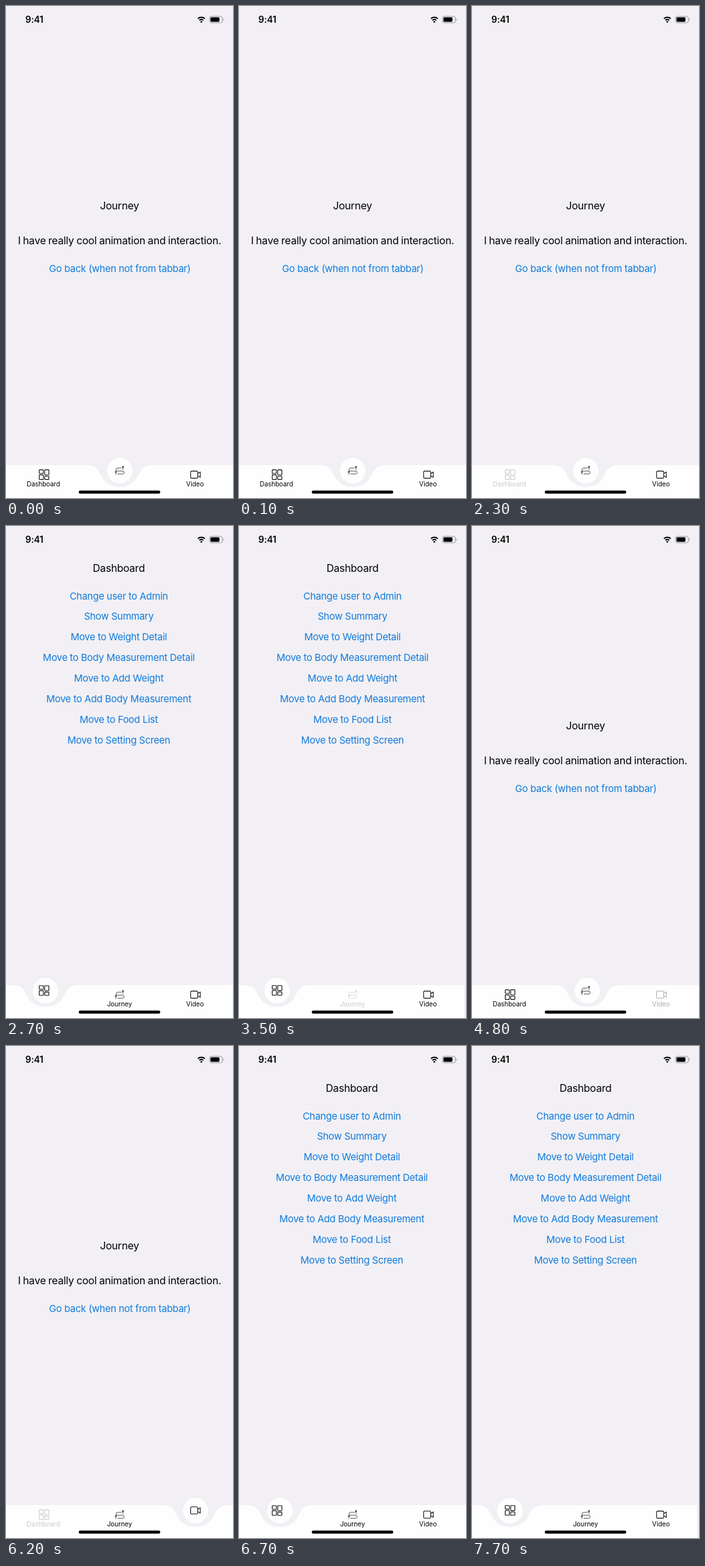
These frames come from a looping animation (352x762 px, 8 s). An HTML page:

```html
<!DOCTYPE html>
<html lang="en">
<head>
<meta charset="utf-8">
<title>Tab bar</title>
<style>
  html, body { margin: 0; width: 100%; height: 100%; overflow: hidden; background: #f2f0f4; }
  svg { display: block; width: 100vw; height: 100vh; }
  text { font: 15px Inter, sans-serif; letter-spacing: -.27px; text-anchor: middle; }
  .title { font-size: 16px; letter-spacing: -.2px; word-spacing: -.5px; }
  .link { fill: #117add; }
  .label { font-size: 10px; letter-spacing: 0; }
  .clock { font-size: 14px; font-weight: 600; letter-spacing: -.1px; }
  .icon { fill: none; stroke: #111; stroke-width: 1.1; stroke-linejoin: round; }
  .thin { stroke: #444; stroke-width: .9; }
</style>
</head>
<body>
<svg viewBox="0 0 352 762">
  <defs>
    <linearGradient id="shade">
      <stop offset="0" stop-opacity="0"/>
      <stop offset="1" stop-opacity=".04"/>
    </linearGradient>
  </defs>
  <rect width="352" height="762" fill="#f2f0f4"/>
  <g id="dashboard">
    <text class="title" x="176" y="71">Dashboard</text>
  </g>
  <rect id="dim" width="352" height="762"/>
  <g id="journey">
    <rect id="edge" x="-9" width="9" height="762" fill="url(#shade)"/>
    <rect width="352" height="762" fill="#f2f0f4"/>
    <text class="title" x="176" y="314.5">Journey</text>
    <text class="title" x="176" y="369">I have really cool animation and interaction.</text>
    <text class="link" x="176.5" y="412">Go back (when not from tabbar)</text>
  </g>

  <path id="bar" fill="#fefefe"/>
  <circle id="knob" cy="719.7" r="19.6" fill="#fefefe"/>
  <g id="tabs">
    <g>
      <g class="icon">
        <rect x="-7.5" y="-7.5" width="6.5" height="5.6" rx=".8"/>
        <rect x="1" y="-7.5" width="6.5" height="7.8" rx=".8"/>
        <rect x="-7.5" y=".2" width="6.5" height="7.3" rx=".8"/>
        <rect x="1" y="2.4" width="6.5" height="5.1" rx=".8"/>
      </g>
      <text class="label" x="58" y="743.5">Dashboard</text>
    </g>
    <g>
      <g class="icon thin">
        <path d="M-3.5 5.5H4.5a2.3 2.3 0 0 0 0-4.6H-3.5a2.3 2.3 0 0 1 0-4.6H3M-6 2V6.5M5-5.5V-1"/>
        <circle cx="-6" cy="2.2" r="1.1" fill="#444"/>
        <circle cx="5" cy="-5.5" r="1.1" fill="#444"/>
      </g>
      <text class="label" x="176" y="743.5">Journey</text>
    </g>
    <g>
      <g class="icon">
        <rect x="-7.5" y="-5.5" width="11" height="11" rx="1.5"/>
        <path d="M3.5-1.6L7.4-4.2V4.2L3.5 1.6"/>
      </g>
      <text class="label" x="293" y="743.5">Video</text>
    </g>
  </g>
  <rect x="112.8" y="750.4" width="126.4" height="4.9" rx="2.4"/>

  <text class="clock" x="44" y="26">9:41</text>
  <g fill="none" stroke="#000" stroke-width="2">
    <path d="M297.6 19.6a7.6 7.6 0 0 1 10.6 0M299.9 22.2a4.4 4.4 0 0 1 6 0"/>
    <path d="M302.9 26.2l-1.8-2a2.6 2.6 0 0 1 3.6 0z" fill="#000" stroke="none"/>
    <rect x="315.5" y="16" width="20" height="10" rx="2.8" stroke="#9b9a9d" stroke-width="1"/>
    <rect x="317" y="17.5" width="14" height="7" rx="1.4" fill="#000" stroke="none"/>
    <path d="M337.2 19.4v3.2" stroke="#9b9a9d" stroke-width="1"/>
  </g>
</svg>
<script>
const LOOP = 8000, WIDTH = 352;
const $ = id => document.getElementById(id);
const tabs = [...$('tabs').children];

// Each tap: finger down, release, tab left, tab entered
const taps = [
  { down: 2290, up: 2340, from: 1, to: 0 },
  { down: 3490, up: 3660, from: 0, to: 1 },
  { down: 4590, up: 4760, from: 1, to: 2 },
  { down: 6190, up: 6340, from: 2, to: 0 },
];

const links = ['Change user to Admin', 'Show Summary', 'Move to Weight Detail',
  'Move to Body Measurement Detail', 'Move to Add Weight', 'Move to Add Body Measurement',
  'Move to Food List', 'Move to Setting Screen'];
$('dashboard').innerHTML += links.map((text, i) =>
  `<text class="link" x="176" y="${113.5 + 31.9 * i}">${text}</text>`).join('');

const clamp = x => Math.max(0, Math.min(1, x));
const mix = (a, b, k) => a + (b - a) * k;
const easeInOut = x => x < .5 ? 2 * x * x : 1 - 2 * (1 - x) ** 2;
const tabX = i => 59 + 117.4 * i;

// Critically damped spring: stiffness 1000, mass 3
function spring(ms) {
  const s = Math.sqrt(1000 / 3) * Math.max(0, ms) / 1000;
  return 1 - Math.exp(-s) * (1 + s);
}

function barPath(x) {
  return `M0 711H${x - 53}C${x - 37} 711 ${x - 33} 718 ${x - 29} 727` +
    `C${x - 24} 738 ${x - 13} 745 ${x} 745S${x + 24} 738 ${x + 29} 727` +
    `C${x + 33} 718 ${x + 37} 711 ${x + 53} 711H${Math.min(WIDTH, x + 290)}V762H0Z`;
}

function draw(t) {
  const tap = taps.findLast(tap => t >= tap.down) || { down: 0, up: -LOOP, from: 1, to: 1 };
  const since = t - tap.up;
  const slide = spring(since);
  const move = easeInOut(clamp(since / 400));

  // The journey card covers the dashboard unless the dashboard is the current tab
  const cover = mix(+(tap.from > 0), +(tap.to > 0), slide);
  $('dashboard').setAttribute('transform', `translate(${-.3 * WIDTH * cover})`);
  $('journey').setAttribute('transform', `translate(${WIDTH * (1 - cover)})`);
  $('dim').setAttribute('opacity', .05 * cover);
  $('edge').setAttribute('opacity', cover);

  const x = mix(tabX(tap.from), tabX(tap.to), move);
  $('bar').setAttribute('d', barPath(x));
  $('knob').setAttribute('cx', x);

  tabs.forEach((tab, i) => {
    const raised = mix(+(i === tap.from), +(i === tap.to), move);
    const [icon, label] = tab.children;
    icon.setAttribute('transform', `translate(${tabX(i)} ${725.9 - 6.6 * raised})`);
    label.setAttribute('opacity', clamp(1 - 1.1 * raised));
    tab.setAttribute('opacity', i === tap.to ? mix(.2, 1, clamp(since / 250)) : 1);
  });
}

const start = performance.now();
function frame() {
  draw((performance.now() - start) % LOOP);
  requestAnimationFrame(frame);
}
frame();
</script>
</body>
</html>
```
